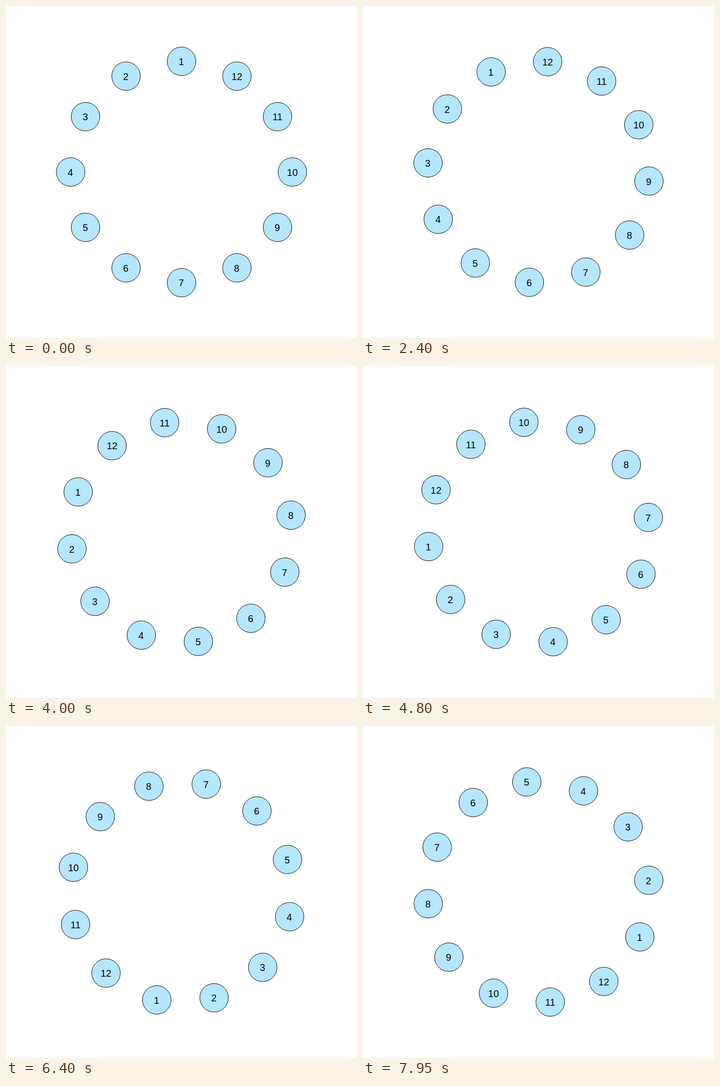
Animation of 724 by 686 pixels, one loop 8 s. Source, as an HTML page:

```html
<!DOCTYPE html>
<html lang="en">
<head>
<meta charset="utf-8">
<title>Number ring</title>
<style>
  html, body { margin: 0; width: 100%; height: 100%; overflow: hidden; background: #fff; }
  svg { display: block; width: 724px; height: 686px; }
  circle { fill: #b5e7ff; stroke: #000; stroke-width: 1; }
  text { font: 20px "Liberation Sans", Arial, sans-serif; text-anchor: middle; fill: #000; }
</style>
</head>
<body>
<svg id="stage" viewBox="0 0 724 686"></svg>
<script>
const NS = "http://www.w3.org/2000/svg";
const COUNT = 12, CX = 362, CY = 343, RADIUS = 686 / 3;
const LOOP = 8000, STEP = 50, SWING = 20000;
const stage = document.getElementById("stage");

function add(parent, tag, attrs = {}) {
  const el = document.createElementNS(NS, tag);
  for (const key in attrs) el.setAttribute(key, attrs[key]);
  return parent.appendChild(el);
}

const balls = Array.from({ length: COUNT }, (_, i) => {
  const ball = add(stage, "g");
  add(ball, "circle", { r: 29.5 });
  add(ball, "text", { x: i < 9 ? -0.5 : 0, y: 7.8 }).textContent = i + 1;
  return ball;
});

// Two full turns with a sine ease over SWING; the loop shows its first part.
function draw(ms) {
  const t = Math.floor((ms % LOOP + 0.5) / STEP) * STEP % LOOP;
  const turn = 2 * Math.PI * (1 - Math.cos(Math.PI * t / SWING));
  balls.forEach((ball, i) => {
    const a = turn + i * 2 * Math.PI / COUNT;
    const x = CX - RADIUS * Math.sin(a);
    const y = CY - RADIUS * Math.cos(a);
    ball.setAttribute("transform", `translate(${x.toFixed(2)} ${y.toFixed(2)})`);
  });
}

const start = performance.now();
function tick() {
  draw(performance.now() - start);
  requestAnimationFrame(tick);
}
tick();
</script>
</body>
</html>
```
